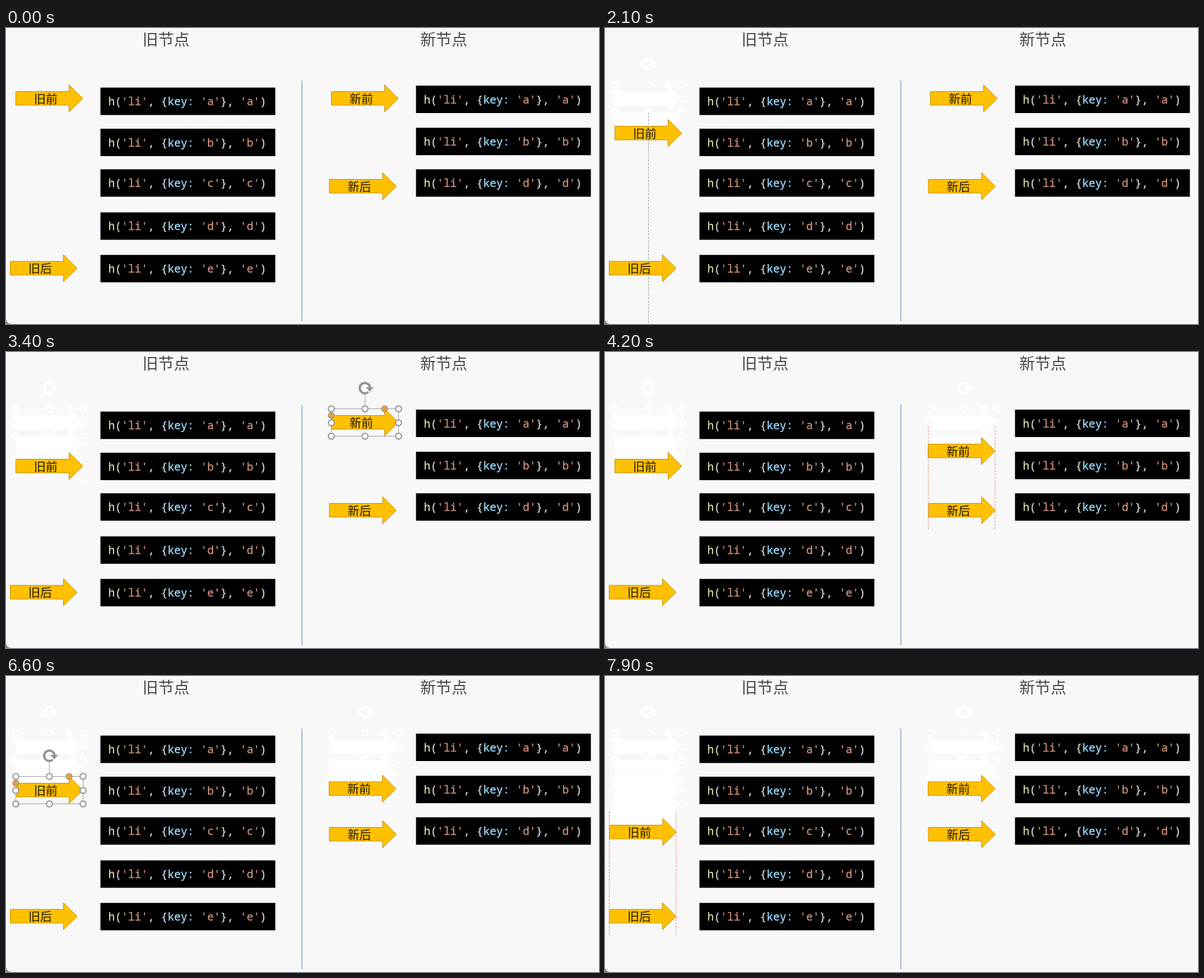
Write an HTML page that moves like this. It is 1058 by 529 pixels and loops after 8000 ms.

```html
<!DOCTYPE html>
<html lang="zh">
<head>
<meta charset="utf-8">
<style>
  html, body { margin: 0; width: 100%; height: 100%; overflow: hidden; background: #f8f8f8; }
  svg { display: block; width: 1058px; height: 529px; }
  text { white-space: pre; }
  .title { font: 300 28px "Noto Sans CJK SC Light", "Noto Sans CJK SC", "Noto Sans CJK", sans-serif; fill: #484848; }
  .label { font: 400 21px "Noto Sans CJK SC DemiLight", "Noto Sans CJK SC", "Noto Sans CJK", sans-serif; fill: #1c1600; }
  .code { font: 19.6px "Noto Sans Mono", monospace; color: #d4d4d4; }
  .code, .code tspan { fill: currentColor; stroke: currentColor; stroke-width: .35; }
  .fn { color: #dcdcaa; }
  .str { color: #ce9178; }
  .key { color: #9cdcfe; }
  .arrow { fill: #ffc000; stroke: #bc8c00; }
  .trail { fill: #fff; }
  .frame { fill: none; stroke: #999; }
  .handle { fill: #fff; stroke: #929292; stroke-width: 2; }
  .adjust { fill: #f0a02c; stroke: #929292; stroke-width: 1.5; }
  .turn { fill: none; stroke: #929292; stroke-width: 4; }
  .tip { fill: #929292; }
  .faded .frame { stroke: #fff; stroke-dasharray: 4 2; }
  .faded .handle { fill: #f8f8f8; stroke: #fff; }
  .faded .adjust { fill: #fff; stroke: #fff; }
  .faded .turn { stroke: #fff; }
  .faded .tip { fill: #fff; }
  .guide { fill: none; stroke-dasharray: 4 2; }
</style>
</head>
<body>
<svg id="stage" viewBox="0 0 1058 529"></svg>
<script>
const LOOP = 8000;
const ARROW = 'M.5 12.5H95.5V.5L120 25L95.5 49V37H.5Z';

const at = (x, y, body, extra = '') => `<g transform="translate(${x} ${y})" ${extra}>${body}</g>`;
const during = (from, to, body) => `<g data-from="${from}" data-to="${to}">${body}</g>`;
const dot = (cls, x, y) => `<circle class="${cls}" cx="${x}" cy="${y}" r="5.3"/>`;

const codeBox = (x, y, k) => at(x, y, `<rect width="312" height="49"/>
  <text class="code" x="14" y="31.5"><tspan class="fn">h</tspan>(<tspan class="str">'li'</tspan>, {<tspan
  class="key">key:</tspan> <tspan class="str">'${k}'</tspan>}, <tspan class="str">'${k}'</tspan>)</text>`);

const arrow = (x, y, label, id) => at(x, y,
  `<path class="arrow" d="${ARROW}"/><text class="label" x="33" y="32.5">${label}</text>`, id ? `id="${id}"` : '');

const trail = (x, y, from) => during(from, LOOP, at(x, y, `<path class="trail" d="${ARROW}"/>`));

const handles = `<path class="frame" d="M.5 .5H120.5V49.5H.5ZM60.5 .5V-26"/>`
  + [[0, 0], [60, 0], [120, 0], [0, 25], [120, 25], [0, 49], [60, 49], [120, 49]]
      .map(([x, y]) => dot('handle', x + .5, y + .5)).join('')
  + dot('adjust', 95.5, .5) + dot('adjust', .5, 12.5)
  + '<path class="turn" d="M66.5 -29.5A9.3 9.3 0 1 1 69.5 -38"/><path class="tip" d="M62 -38H76L69 -30Z"/>';

const selection = (x, y, from, to) => during(from, to, at(x, y, handles));
const faded = (x, y, from, opacity = 1) => during(from, LOOP, at(x, y, handles, `class="faded" opacity="${opacity}"`));

const line = (d, color, opacity = 1) => `<path class="guide" d="${d}" stroke="${color}" opacity="${opacity}"/>`;
const guide = (d, color, from, to) => during(from, to, line(d, color));
const guideTrail = (d, from) => during(from, LOOP, line(d, '#fff', .8));

// Alignment guides: path, colour, start, end
const GREY = '#999', RED = '#e08878';
const across = [
  ['M5 128.5H1055', GREY, 2000, 2100],
  ['M137 163.5H169M701 163.5H731', GREY, 2000, 2100],
  ['M5 204.5H1055', GREY, 2300, 2600],
  ['M1 228.5H410', GREY, 7700, 7800],
  ['M5 277.5H1053', GREY, 7800, 7900]
];
const down = [
  ['M77.5 151V529', GREY, 2000, 2600],
  ['M577 133V319M696 133V319', RED, 4100, 5300],
  ['M77.5 171V529', GREY, 7600, 7700],
  ['M7.5 242V465M127 242V465', RED, 7800, LOOP]
];

// Steps of the dragged arrows: time, x, y
const moves = {
  oldHead: [[0, 17, 101], [2000, 17, 138], [2100, 17, 163], [2200, 17, 174], [2300, 17, 179],
            [7600, 14, 202.5], [7700, 11, 222], [7800, 8, 246], [7900, 7.5, 254]],
  newHead: [[0, 580, 101], [4000, 579, 107], [4100, 576, 138], [4200, 576, 152],
            [4300, 576, 164], [4400, 576, 173], [4500, 576, 176.5]]
};

const trails = [
  trail(17, 101, 2000), trail(17, 138, 2100), trail(17, 163, 2200), trail(17, 179, 7600),
  trail(14, 203, 7700), trail(11, 222, 7800), trail(8, 246, 7900),
  trail(580, 101, 4100), trail(576, 138, 4200), trail(576, 152, 4300)
].join('');

const fades = [
  faded(17, 101, 2000), faded(17, 179, 3400, .6),
  faded(580, 101, 4000, .9), faded(576, 176, 6600, .6)
].join('');

const selections = [
  selection(17, 101, 500, 2000), selection(17, 179, 2600, 3400),
  selection(580, 101, 3400, 4000), selection(576, 176, 5400, 6600),
  selection(17, 179, 6600, 7600)
].join('');

const stage = document.getElementById('stage');
stage.innerHTML = [
  '<path d="M0 520Q1 528 9 529H0Z" fill="#8a8a8a"/>',
  fades, trails,
  [...across, ...down].map(([d, , , to]) => guideTrail(d, to)).join(''),
  across.map(g => guide(...g)).join(''),
  '<text class="title" x="243.5" y="31">旧节点</text><text class="title" x="739" y="31">新节点</text>',
  '<path d="M528 94V524" stroke="#4472c4"/>',
  [106.5, 180, 252.5, 329.5, 405.5].map((y, i) => codeBox(168.5, y, 'abcde'[i])).join(''),
  [103, 178.3, 252.5].map((y, i) => codeBox(731.5, y, 'abd'[i])).join(''),
  arrow(7, 404.5, '旧后'), arrow(576.5, 258, '新后'),
  arrow(17, 101, '旧前', 'oldHead'), arrow(580, 101, '新前', 'newHead'),
  down.map(g => guide(...g)).join(''),
  selections
].join('');

const timed = [...stage.querySelectorAll('[data-from]')]
  .map(el => ({ el, from: +el.dataset.from, to: +el.dataset.to }));

function draw() {
  const t = performance.now() % LOOP;
  for (const { el, from, to } of timed) el.style.display = t >= from && t < to ? '' : 'none';
  for (const id in moves) {
    const [, x, y] = moves[id].filter(step => step[0] <= t).pop();
    document.getElementById(id).setAttribute('transform', `translate(${x} ${y})`);
  }
  requestAnimationFrame(draw);
}
draw();
</script>
</body>
</html>
```
